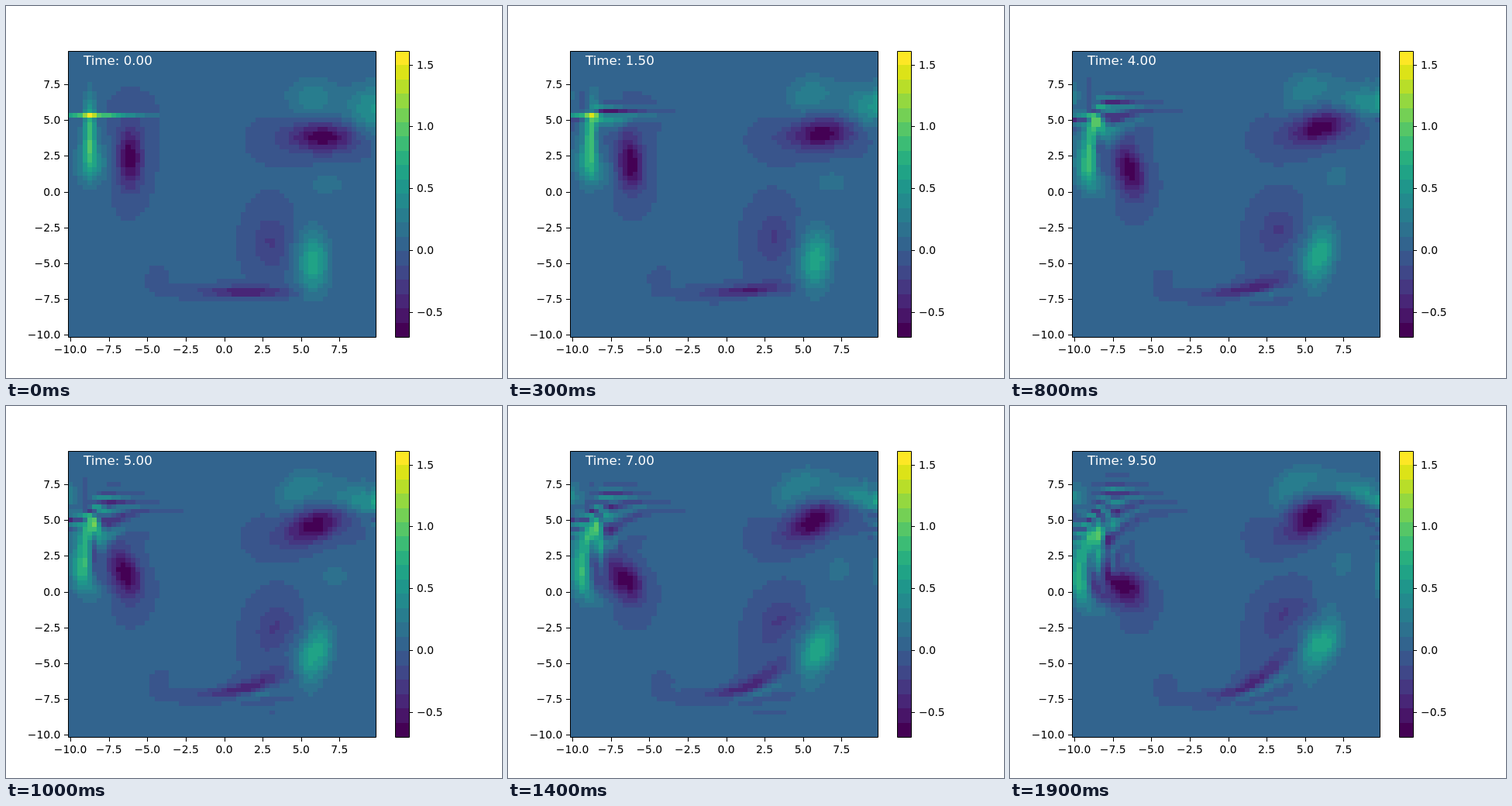
Recreate the animation shown at these times as an HTML page with a canvas. Size 640x480 px, loop 2000 ms.

```html
<!DOCTYPE html>
<html lang="en">
<head>
<meta charset="utf-8">
<title>Vorticity</title>
<style>
  html, body { margin: 0; width: 100%; height: 100%; overflow: hidden; background: #fff; }
  canvas, svg { position: absolute; left: 0; top: 0; width: 640px; height: 480px; }
  text { font: 13.89px "DejaVu Sans", sans-serif; }
  #time { font-size: 16.67px; fill: #fff; }
</style>
</head>
<body>
<canvas id="field" width="640" height="480"></canvas>
<svg id="axes" viewBox="0 0 640 480"><text id="time" x="100" y="76"></text></svg>
<script>
const N = 64, H = 20 / N, FRAMES = 20, FRAME_MS = 100;
const LOW = -0.7, HIGH = 1.612;
const BOX = { left: 80, right: 476.8, top: 57.6, bottom: 427.2 };
const CELL_W = (BOX.right - BOX.left) / N, CELL_H = (BOX.bottom - BOX.top) / N;
const COLORS = ('440154 481568 482677 453781 3f4788 39558c 32648e 2d718e 287d8e 238a8d ' +
  '1f968b 20a386 29af7f 3cbc75 56c667 74d055 94d840 b8de29 dce318 fde725')
  .split(' ').map(c => '#' + c);

// Initial vorticity: amplitude, centre x, centre y, width x, width y
const BLOBS = [
  [0.85, -8.75, 4.2, 0.3, 1.67],
  [0.45, -8.65, 2, 0.75, 1],
  [0.93, -8.2, 5.3, 1.95, 0.08],
  [-0.69, -6.12, 2.35, 0.58, 1.43],
  [-0.05, -6, 5.1, 0.95, 1],
  [-0.7, 6.45, 3.82, 1.45, 0.72],
  [-0.07, 3.4, 3.5, 0.95, 0.8],
  [0.32, 5.7, 6.6, 1.15, 0.95],
  [0.48, 9.8, 5.8, 1.33, 1.2],
  [0.16, 6.7, 0.5, 1, 0.65],
  [-0.25, 3.05, -3.55, 0.83, 1.4],
  [0.68, 5.78, -4.95, 0.72, 1.48],
  [-0.5, 1.35, -7, 1.85, 0.27],
  [-0.04, -4.3, -6.1, 0.4, 0.55]
];

const at = (i, j) => (j & (N - 1)) * N + (i & (N - 1));
const psi = new Float64Array(N * N);

function initialVorticity() {
  return Float64Array.from({ length: N * N }, (_, k) => {
    const x = -10 + (k % N) * H, y = -10 + Math.floor(k / N) * H;
    return BLOBS.reduce((sum, [a, cx, cy, sx, sy]) =>
      sum + a * Math.exp(-(((x - cx) / sx) ** 2 + ((y - cy) / sy) ** 2) / 2), 0);
  });
}

// Periodic Poisson equation by over-relaxation, starting from the last solution
function solveStream(w, sweeps) {
  const mean = w.reduce((a, b) => a + b) / w.length;
  while (sweeps--) {
    for (let j = 0; j < N; j++) for (let i = 0; i < N; i++) {
      const k = j * N + i;
      const around = psi[at(i + 1, j)] + psi[at(i - 1, j)] + psi[at(i, j + 1)] + psi[at(i, j - 1)];
      psi[k] += 0.475 * (around - 4 * psi[k] - H * H * (w[k] - mean));
    }
  }
}

// Arakawa Jacobian of stream function and vorticity
function rate(w) {
  solveStream(w, 40);
  const p = psi, out = new Float64Array(N * N);
  for (let j = 0; j < N; j++) for (let i = 0; i < N; i++) {
    const e = at(i + 1, j), v = at(i - 1, j), n = at(i, j + 1), s = at(i, j - 1);
    const ne = at(i + 1, j + 1), nw = at(i - 1, j + 1), se = at(i + 1, j - 1), sw = at(i - 1, j - 1);
    const plain = (p[e] - p[v]) * (w[n] - w[s]) - (p[n] - p[s]) * (w[e] - w[v]);
    const fluxW = p[e] * (w[ne] - w[se]) - p[v] * (w[nw] - w[sw])
                - p[n] * (w[ne] - w[nw]) + p[s] * (w[se] - w[sw]);
    const fluxP = w[n] * (p[ne] - p[nw]) - w[s] * (p[se] - p[sw])
                - w[e] * (p[ne] - p[se]) + w[v] * (p[nw] - p[sw]);
    out[j * N + i] = (plain + fluxW + fluxP) / (12 * H * H);
  }
  return out;
}

function step(w, dt) {
  const ahead = (d, f) => w.map((v, k) => v + f * d[k]);
  const a = rate(w), b = rate(ahead(a, dt / 2)), c = rate(ahead(b, dt / 2)), d = rate(ahead(c, dt));
  return w.map((v, k) => v + dt / 6 * (a[k] + 2 * b[k] + 2 * c[k] + d[k]));
}

const level = v => Math.max(0, Math.min(19, Math.floor((v - LOW) / (HIGH - LOW) * 20)));

function simulate() {
  let w = initialVorticity();
  solveStream(w, 400);
  const frames = [];
  for (let f = 0; f < FRAMES; f++) {
    frames.push(Uint8Array.from(w, level));
    if (f < FRAMES - 1) w = step(step(w, 0.25), 0.25);
  }
  return frames;
}

const svg = document.getElementById('axes'), timeText = document.getElementById('time');
const ctx = document.getElementById('field').getContext('2d');

function add(tag, attrs, label = '') {
  const el = document.createElementNS('http://www.w3.org/2000/svg', tag);
  for (const key in attrs) el.setAttribute(key, attrs[key]);
  el.textContent = label;
  svg.append(el);
}
const outline = d => add('path', { d, fill: 'none', stroke: '#000' });
const label = (x, y, anchor, value) =>
  add('text', { x, y, 'text-anchor': anchor }, value.toFixed(1).replace('-', '\u2212'));
const snap = v => Math.round(v) + 0.5;

function drawAxes() {
  outline('M80.5 58.5H477.5V427.5H80.5Z');
  for (let k = 0; k < 8; k++) {
    const value = -10 + 2.5 * k;
    const x = BOX.left + CELL_W * (8 * k + 0.5), y = BOX.bottom - CELL_H * (8 * k + 0.5);
    outline(`M${snap(x)} 428v5M80 ${snap(y)}h-5`);
    label(x, 448, 'middle', value);
    label(70.3, Math.round(y + 5), 'end', value);
  }
  const height = BOX.bottom - BOX.top;
  COLORS.forEach((fill, k) => {
    const top = Math.round(BOX.bottom - height * (k + 1) / 20);
    add('rect', { x: 502, y: top, width: 18, height: Math.round(BOX.bottom - height * k / 20) - top, fill });
  });
  outline('M502.5 58.5H520.5V427.5H502.5Z');
  for (const value of [-0.5, 0, 0.5, 1, 1.5]) {
    const y = BOX.bottom - height * (value - LOW) / (HIGH - LOW);
    outline(`M521 ${snap(y)}h4`);
    label(530, Math.round(y + 5), 'start', value);
  }
}

function drawField(levels) {
  for (let j = 0; j < N; j++) {
    const top = Math.round(BOX.bottom - CELL_H * (j + 1));
    const bottom = Math.round(BOX.bottom - CELL_H * j);
    for (let i = 0; i < N; i++) {
      const left = Math.round(BOX.left + CELL_W * i);
      const right = Math.round(BOX.left + CELL_W * (i + 1));
      ctx.fillStyle = COLORS[levels[j * N + i]];
      ctx.fillRect(left, top, right - left, bottom - top);
    }
  }
}

drawAxes();
const frames = simulate();
let shown = -1, start = null;

function tick(now) {
  start ??= now;
  const index = Math.floor((now - start) / FRAME_MS) % FRAMES;
  if (index !== shown) {
    shown = index;
    drawField(frames[index]);
    timeText.textContent = 'Time: ' + (index / 2).toFixed(2);
  }
  requestAnimationFrame(tick);
}
requestAnimationFrame(tick);
</script>
</body>
</html>
```
